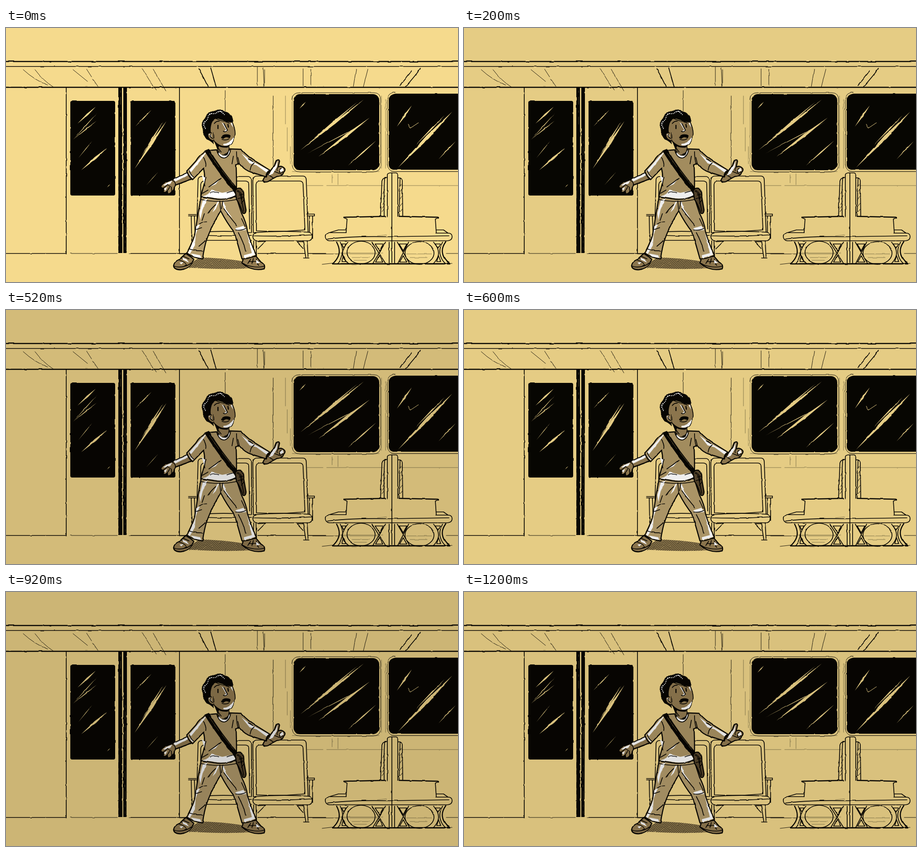
Recreate the animation shown at these times as an HTML page. Size 998 by 561 pixels, loop 1.4 s.

```html
<!DOCTYPE html>
<html lang="en">
<head>
<meta charset="utf-8">
<title>Flickering train car</title>
<style>
html, body { margin: 0; width: 100%; height: 100%; overflow: hidden; background: #f5da8d; }
svg { display: block; width: 100vw; height: 100vh; }
.ink { fill: none; stroke: #080602; stroke-width: 1.7; stroke-linecap: round; stroke-linejoin: round; }
.thin { stroke-width: .9; }
.faint { stroke-width: .8; opacity: .55; }
.bold { stroke-width: 2.4; }
.wall { fill: #f5da8d; }
.skin { fill: #957d52; }
.shirt { fill: #ae9665; }
.pants { fill: #b69e6d; }
.bag { fill: #57462c; }
.lit { fill: #fff; stroke: none; }
.dark { fill: #080602; stroke: none; }
#dim { animation: flicker 1.4s step-end infinite; }
@keyframes flicker {
  0% { opacity: 0; }
  14.2857% { opacity: .065; }
  28.5714% { opacity: .14; }
  42.8571% { opacity: .065; }
  57.1429% { opacity: .17; }
  71.4286% { opacity: .065; }
  85.7143% { opacity: .114; }
}
</style>
</head>
<body>
<svg viewBox="0 0 998 561" preserveAspectRatio="none">
<defs>
  <filter id="hand" filterUnits="userSpaceOnUse" x="0" y="0" width="998" height="561" color-interpolation-filters="sRGB">
    <feTurbulence type="fractalNoise" baseFrequency=".06" numOctaves="2" seed="4"/>
    <feDisplacementMap in="SourceGraphic" scale="2.4" xChannelSelector="R" yChannelSelector="G"/>
  </filter>
  <clipPath id="shade"><path d="M398 529Q410 514 430 507Q480 508 521 515L538 531Q470 534 398 529Z"/></clipPath>
</defs>
<rect class="wall" width="998" height="561"/>

<g filter="url(#hand)">
  <!-- ceiling and walls -->
  <g class="ink">
    <path class="bold" d="M-5 74H1003M-5 131H1003"/>
    <path d="M-5 85H1003M-5 498H133M133 131V499M383 132V498M272 498H408M668 498H706"/>
    <path class="thin" d="M142 498H246M383 499H408M677 499H735M972 498H1003"/>
    <path class="thin" d="M64 92Q82 116 104 130M38 92Q64 116 92 126M148 92L180 118M178 91L189 108M192 113L203 129M301 90Q316 116 332 137M325 91L353 139M555 86V127M568 88L570 129M571 92V128M656 90V128M673 90V127M773 92L767 129M799 91L789 130"/>
    <path d="M426 91Q438 112 446 130M452 88L464 130M896 94Q882 113 870 127M916 89Q898 112 882 130"/>
    <path class="thin" d="M484 138V184M590 150V327"/>
    <path class="faint" d="M617 150V212M621 220V272M628 262V300M632 150V304M632 317Q720 320 824 317M665 348H700M708 348H833M868 348H998M720 325V341M733 322V346M470 131H490M829 150V310M838 158V310M850 317H998"/>
  </g>

  <!-- windows -->
  <g class="dark">
    <rect x="142" y="161" width="99" height="209" rx="4"/>
    <rect x="275" y="161" width="99" height="209" rx="4"/>
    <rect x="635" y="146" width="189" height="168" rx="14"/>
    <path d="M860 145H1003V313H856Q845 312 845 300V159Q846 147 860 145Z"/>
    <path d="M248 132H256L257 497H248ZM259 132H267V240L266 497H259Z"/>
  </g>
  <path class="ink thin" d="M631 158Q632 143 648 143H812Q828 143 827 160V304Q826 318 810 318H650Q634 318 632 304M842 302V158Q843 142 860 142M842 302Q844 317 858 317H1003"/>
  <g id="glints" fill="#f5da8d"></g>
  <path d="M888 212L893 221L911 209" fill="none" stroke="#f5da8d"/>
  <path d="M249 345V495M263 250V490M253 138V220" stroke="#f5da8d" stroke-width=".6" stroke-dasharray="5 9 17 13" fill="none" opacity=".5"/>

  <!-- double seat -->
  <g class="ink">
    <path d="M421 452L424 335Q425 328 432 328H534Q542 328 542 336V452"/>
    <path d="M430 446V346Q431 338 438 338H528Q536 338 536 346L538 444"/>
    <path d="M546 452L545 337Q546 327 554 327H655Q663 327 663 336L667 451"/>
    <path d="M553 448L552 346Q553 338 560 338H648Q656 338 656 346L660 446Q606 451 553 448"/>
    <path d="M547 452Q607 447 668 451Q677 453 676 460Q676 469 668 470H553Q545 468 545 460Q545 454 552 453M546 459Q610 461 676 457M540 452Q486 447 432 451M542 458Q490 460 436 458M542 469H434"/>
    <path d="M403 412H420M403 415H420M409 415L410 470M416 415L418 470M410 470H422M664 411H681V415H665M670 415V451M677 415L677 465"/>
    <path d="M547 470L546 500M552 470L553 504M656 470L662 507M665 470L667 508M657 508H670M556 472L573 471L556 488M656 487L642 472H656M556 498H660"/>
  </g>

  <!-- benches -->
  <g class="ink">
    <path d="M842 416V324Q843 320 850 320H860Q865 320 865 325V416M852 320V518"/>
    <path d="M841 331Q832 330 830 338L827 416M836 332Q834 360 835 416M866 331Q874 330 875 338L876 416M870 333L868 416"/>
    <path class="bold" d="M746 418L838 416M868 416L955 418"/>
    <path d="M746 419L753 422L751 452M955 419L948 422L950 452"/>
    <path d="M751 452H714Q705 452 705 459Q705 469 714 470H975Q985 469 985 461Q985 453 976 453H949M710 466Q770 459 846 461Q920 460 978 459M714 452L734 446H750M950 446H966L976 453"/>
    <path class="bold" d="M730 473Q738 488 735 500Q732 511 721 521H980Q966 510 964 498Q961 486 971 472"/>
    <path d="M738 473Q746 490 742 502Q740 513 733 520M964 473Q955 489 959 502Q962 513 970 520M755 473Q733 497 755 520M944 473Q966 497 944 520"/>
    <ellipse cx="784" cy="496" rx="31" ry="25"/><ellipse cx="913" cy="497" rx="32" ry="25"/>
    <path d="M808 473L838 520M838 473L810 520M846 473V519M858 473V519M864 473L891 520M889 473L865 520M815 477H833L825 492ZM816 517H832L824 502ZM868 477H885L877 492ZM869 517H885L877 503ZM741 477H751L746 486ZM947 477H959L954 486ZM742 516H750L746 503ZM951 516H960L955 503Z"/>
    <path class="thin" d="M698 522L724 519M740 520H985M832 390L836 382M831 398L836 390M830 406L835 399M832 366L836 358M833 378L837 370M869 350L873 345M869 364L874 357M868 380L874 373M869 394L875 387M869 406L875 400"/>
    <path class="faint" d="M740 499H820M764 507H803M768 513H796M884 499H940M892 507H930M735 497H832M820 459L840 457"/>
  </g>

  <!-- ground shadow -->
  <path d="M398 529Q410 514 430 507Q480 508 521 515L538 531Q470 534 398 529Z" fill="#9c8556"/>
  <path id="hatch" class="ink thin" clip-path="url(#shade)"/>

  <!-- shoes and trousers -->
  <g class="ink">
    <path class="skin bold" d="M397 498L383 511Q371 516 370 525Q371 534 386 534Q401 532 409 522L415 510Z"/>
    <path d="M371 526Q390 532 409 519M383 513Q393 515 398 523M387 508L400 513M391 504L404 510"/>
    <path class="skin bold" d="M524 508L521 519Q528 525 538 530Q554 536 570 532Q574 523 563 517L552 504Z"/>
    <path d="M522 520Q548 532 571 526M540 511L534 520M546 509L544 520M553 510Q552 519 558 524M536 516L560 515"/>
    <path class="lit" d="M389 507L399 511L404 518L391 512ZM552 512L561 518L553 520ZM383 518L392 517L387 522Z"/>
    <path class="pants bold" d="M431 372Q425 402 419 443Q416 466 399 497Q414 508 434 510Q436 492 441 474Q451 442 474 404Q488 431 504 451Q513 481 521 510Q536 510 553 502Q541 478 533 449Q531 430 520 409L508 372Q470 380 431 372Z"/>
    <path class="lit" d="M435 379L445 376L434 401L429 424L427 409ZM420 438L429 432L422 447L418 459ZM415 468L419 455L417 480L406 499L402 497ZM467 384L471 382L463 400L456 407ZM477 386L480 382L486 401L500 420L485 407ZM506 443L524 437L531 446L511 448ZM532 452L550 501L544 502ZM408 498L429 502L431 508L415 505ZM525 502L547 496L550 501L526 508Z"/>
    <path d="M474 404L472 382M479 382L476 399M481 399Q499 424 510 436M463 390Q452 400 446 409M427 433Q435 427 443 427M420 445L432 441M507 446Q519 448 529 443M513 452Q525 474 529 493M440 470L426 482M405 488Q418 493 434 492M431 379Q470 387 508 379M520 421L528 438M438 410L433 425"/>
  </g>

  <!-- arms, neck and shirt -->
  <g class="ink">
    <path class="skin bold" d="M405 317Q389 325 367 335L354 340Q344 344 342 350Q342 354 348 354L346 362Q352 365 356 360L357 366Q363 367 366 361Q373 357 374 347L412 333Z"/>
    <path d="M348 353L356 347L363 350M356 360L361 352M366 361L365 351M367 336Q375 340 374 347"/>
    <path class="lit" d="M403 319L370 335L374 339L406 323ZM357 341L367 337L363 344L350 348L347 347ZM349 355L356 351L351 361Z"/>
    <path class="skin bold" d="M570 331L582 318Q587 310 592 305L597 293Q602 289 604 294L601 307Q608 303 615 310Q618 314 612 320Q608 328 598 328Q588 333 579 339Q571 342 567 337Z"/>
    <path d="M601 307Q597 312 599 315M608 310Q602 313 604 319L613 318M593 317L608 323M579 324L590 331"/>
    <path class="lit" d="M586 315L595 304L600 292L598 307L589 322L580 326ZM604 314L611 309L613 315L607 318Z"/>
    <path class="skin" d="M464 253L468 270L473 281Q486 282 493 273L492 258Z"/>
    <path class="shirt bold" d="M443 271Q428 278 419 294L399 316Q403 328 412 335L436 310Q440 324 438 343L430 372Q447 375 466 378Q489 380 508 370Q510 346 508 302L514 299Q528 315 543 319L575 329Q576 320 584 315L552 295Q536 286 519 268L493 267Q491 281 479 284Q470 281 465 269Z"/>
    <path class="lit" d="M436 278L443 274L429 293L409 318L403 316ZM474 331L449 351L444 353L463 345ZM454 358L478 364L501 359L507 369Q489 379 466 376L433 371L446 367ZM520 277L543 294L580 314L575 319L553 303L538 299ZM470 275Q477 285 489 281L493 270L495 276L486 287Q474 287 467 276ZM432 323L440 331L438 345ZM404 319L412 326L414 332L409 329Z"/>
    <path d="M466 272Q471 288 483 287Q493 284 496 269M436 286Q443 298 441 307M437 309L427 319M442 329Q437 343 439 349M509 273Q509 290 513 302M515 299L512 286M502 283L499 300M574 328Q574 319 581 315M548 298Q539 305 539 314M535 289L545 295M414 329Q407 324 405 315M475 331Q462 342 448 351M451 364Q462 361 470 364M487 364L501 360M434 365L446 358"/>
    <path class="dark" d="M438 271L448 267Q475 312 512 355L508 368Q465 315 438 271Z"/>
    <path d="M449 277L470 307M477 315L503 348" stroke="#81704a" stroke-width=".8"/>
    <path class="bag bold" d="M506 359Q512 351 520 355Q526 359 525 373L530 402Q529 412 523 409Q514 384 509 379Z"/>
    <path d="M510 360Q518 363 519 376L525 405M513 359Q522 364 521 378M512 377L523 374M515 369L523 367M525 380L520 387"/>
  </g>

  <!-- head -->
  <g class="ink">
    <g id="curls" class="dark"></g>
    <path class="dark" d="M459 257Q452 249 443 246Q434 234 436 213Q442 190 466 185Q491 181 499 195L501 210Q479 204 467 200L453 220Z"/>
    <path class="skin" d="M452 215Q454 203 464 200Q471 204 478 205L499 208Q506 220 506 234Q504 251 496 257Q488 263 477 261Q466 258 460 251L454 236Q449 229 452 215Z"/>
    <path class="skin" d="M454 232Q445 229 446 239Q449 248 459 249"/>
    <path class="lit" d="M476 208L482 211L489 228L480 229L486 225ZM480 256Q493 255 504 240Q503 251 495 257Q488 261 480 259ZM496 211L499 210L502 220ZM447 234L452 235L455 244Z"/>
    <path class="dark" d="M475 243Q475 237 483 235Q493 234 496 238L494 244Q486 238 480 245Z"/>
    <path class="bold" d="M468 215V222M490 213L491 219"/>
    <path d="M460 211Q464 205 471 206M486 207L493 210M481 211L489 226Q484 231 480 228M477 246Q485 249 492 245M451 235Q450 241 456 244M458 231L459 243M461 251Q473 263 485 263M469 266L475 274"/>
    <path class="dark" d="M460 251L468 257Q480 263 491 261L490 264Q478 265 470 261L468 271Z"/>
    <g id="sparkles" class="lit"></g>
  </g>
</g>
<rect id="dim" width="998" height="561" fill="#000" opacity="0"/>
</svg>
<script>
const NS = 'http://www.w3.org/2000/svg';
const byId = id => document.getElementById(id);
const add = (parent, tag, attrs) => {
  const el = document.createElementNS(NS, tag);
  for (const k in attrs) el.setAttribute(k, attrs[k]);
  parent.append(el);
};

// Tapered streaks on the glass: x1, y1, x2, y2, width
const glints = [
  [198, 174, 158, 211, 4], [201, 188, 148, 247, 1.6], [200, 205, 150, 245, 2],
  [223, 265, 166, 314, 5], [190, 250, 160, 287, 1.2], [230, 345, 223, 352, 1.2],
  [321, 181, 286, 217, 2], [354, 206, 284, 311, 6], [347, 207, 299, 283, 3], [336, 318, 310, 347, .9],
  [790, 158, 650, 270, 5], [775, 164, 668, 254, 3], [803, 198, 690, 284, 6], [797, 208, 665, 277, 1.5],
  [817, 249, 755, 304, 3], [662, 163, 648, 178, 2],
  [896, 171, 863, 218, 4], [985, 185, 866, 308, 8], [968, 193, 905, 258, 3], [993, 250, 955, 290, 2]
];
for (const [x1, y1, x2, y2, w] of glints) {
  const len = Math.hypot(x2 - x1, y2 - y1);
  const nx = (y1 - y2) / len * w / 2, ny = (x2 - x1) / len * w / 2;
  const mx = x1 + (x2 - x1) * .45, my = y1 + (y2 - y1) * .45;
  add(byId('glints'), 'path', {
    d: `M${x1} ${y1}L${mx + nx} ${my + ny}L${x2} ${y2}L${mx - nx} ${my - ny}Z`
  });
}

let hatch = '';
for (let x = 400; x < 560; x += 5) hatch += `M${x} 506L${x - 34} 533`;
byId('hatch').setAttribute('d', hatch);

// Curly hair edge with small highlights
for (let i = 0; i < 30; i++) {
  const a = 2.4 + i * .121, wob = Math.sin(i * 7.3);
  const x = 469 + 33 * Math.cos(a), y = 218 + 34 * Math.sin(a);
  add(byId('curls'), 'circle', { cx: x, cy: y, r: 3.3 + wob });
  if (i > 4 && i < 24) {
    const k = 29 + 2 * wob;
    add(byId('sparkles'), 'ellipse', {
      cx: 469 + (k + 2) * Math.cos(a), cy: 218 + (k + 3) * Math.sin(a), rx: 1.5 + .5 * wob, ry: 1.1
    });
  }
}
</script>
</body>
</html>
```
